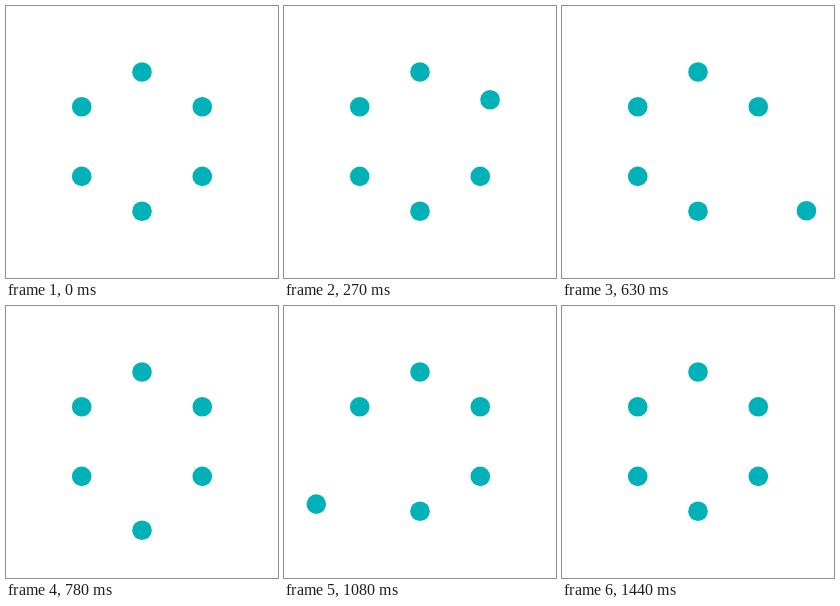
These frames come from a looping animation (272 by 272 pixels, 1.47 s). An HTML page:

```html
<!DOCTYPE html>
<html lang="en">
<head>
<meta charset="utf-8">
<title>Hexagon loader</title>
<style>
  html, body { margin: 0; width: 100%; height: 100%; overflow: hidden; background: #fff; }
  svg { display: block; width: 100%; height: 100%; }
</style>
</head>
<body>
<svg viewBox="0 0 272 272" fill="#00b1b7"></svg>
<script>
const LOOP = 1470, STEP = 30, SLOT = 240, OUT = 150;
const CENTER = { x: 136, y: 135.6 }, RING = 69.6, DOT = 9.8;

// Farthest offset of each dot, clockwise from the top
const throws = [[0, -44.8], [49, -35], [48.2, 34.3], [0, 47.7], [-54.3, 34.6], [-54.3, -35]];

const svg = document.querySelector("svg");
const dots = throws.map(([dx, dy], i) => {
  const angle = (i * 60 - 90) * Math.PI / 180;
  const el = document.createElementNS("http://www.w3.org/2000/svg", "circle");
  el.setAttribute("r", DOT);
  svg.append(el);
  return { el, dx, dy, x: CENTER.x + RING * Math.cos(angle), y: CENTER.y + RING * Math.sin(angle) };
});

// Linear push outwards, then a quicker linear return
function reach(t) {
  if (t <= 0 || t >= SLOT) return 0;
  return t < OUT ? t / OUT : (SLOT - t) / (SLOT - OUT);
}

function draw(now) {
  const t = Math.floor((now + 1) / STEP) * STEP % LOOP;
  dots.forEach((d, i) => {
    const k = reach(t - i * SLOT);
    d.el.setAttribute("cx", d.x + d.dx * k);
    d.el.setAttribute("cy", d.y + d.dy * k);
  });
}

let start;
function tick(now) {
  start ??= now;
  draw(now - start);
  requestAnimationFrame(tick);
}
draw(0);
requestAnimationFrame(tick);
</script>
</body>
</html>
```
